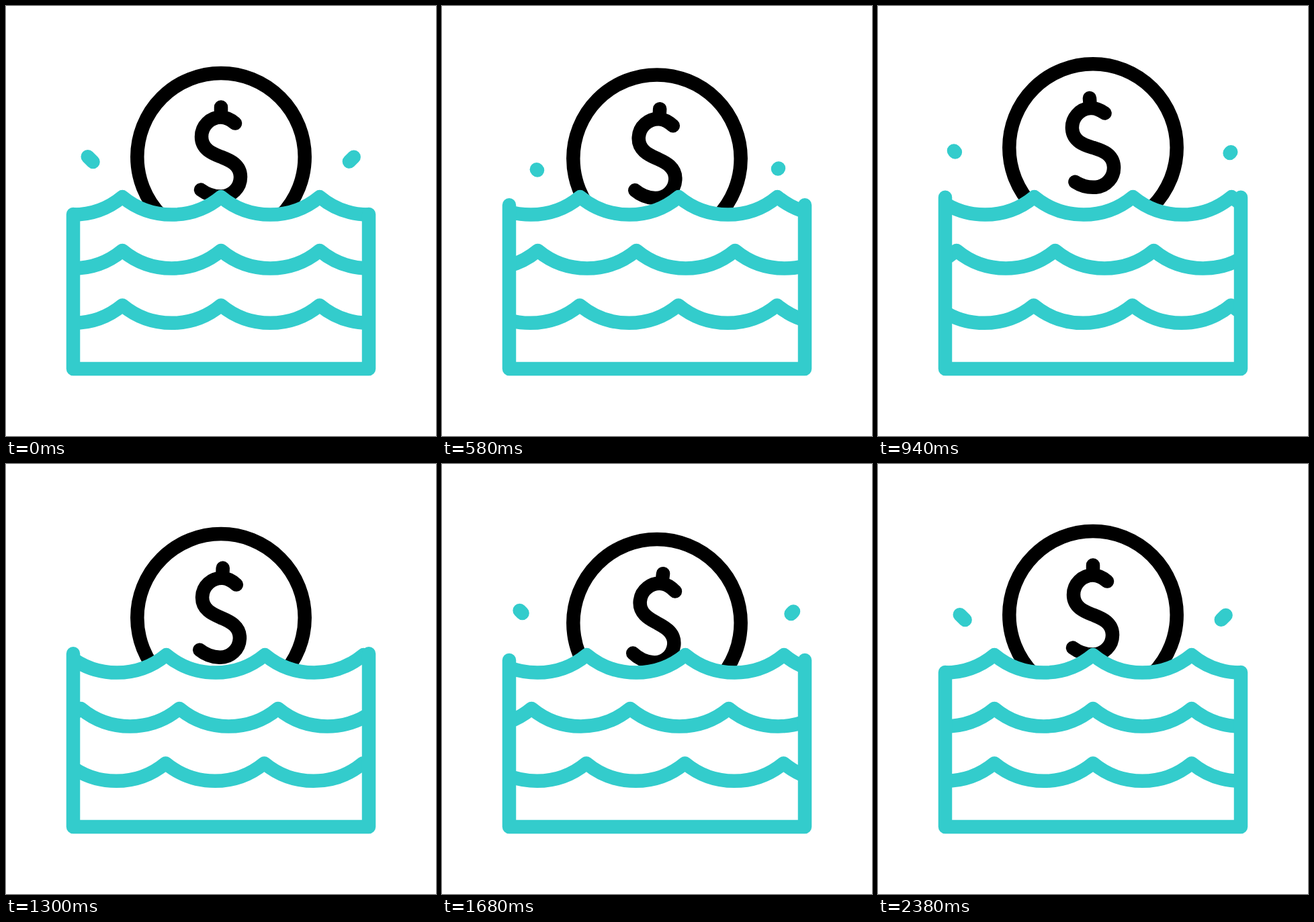
An HTML page for the animation above (2400 ms loop, 640 by 640 pixels).

```html
<!DOCTYPE html>
<html lang="en">
<head>
<meta charset="utf-8">
<title>Floating coin</title>
<style>
  html, body { margin: 0; width: 100%; height: 100%; overflow: hidden; background: #fff; }
  svg { display: block; width: 100%; height: 100%; fill: none; stroke: #33cccc; stroke-width: 20.5; stroke-linecap: round; stroke-linejoin: round; }
</style>
</head>
<body>
<svg viewBox="0 0 640 640">
  <clipPath id="tank"><rect x="100" width="440" height="640"/></clipPath>
  <g id="coin" stroke="#000">
    <circle r="124.7"/>
    <path id="dollar" d="M0-74V-62M21-50C15-55 8-59 0-59C-16-59-29-46-29-30C-29-10-10-4 0 0C10 4 29 10 29 30C29 46 16 59 0 59C-12 59-22 55-30 49"/>
  </g>
  <path id="leftDrop"/>
  <path id="rightDrop"/>
  <g id="waves" clip-path="url(#tank)"></g>
  <path id="box"/>
</svg>
<script>
const $ = id => document.getElementById(id);
const LOOP = 2400, LAST = 2380;

const arcs = 'a115 115 0 0 0 146.8 0'.repeat(7);
const waves = [
  { y: 284.1, drift: 67 },
  { y: 364, drift: -63.5 },
  { y: 445.4, drift: 66 }
].map(({ y, drift }, i) => {
  const path = document.createElementNS('http://www.w3.org/2000/svg', 'path');
  path.setAttribute('d', `M-120.4 ${y}${arcs}` + (i ? '' : 'V700H-120.4Z'));
  if (!i) path.setAttribute('fill', '#fff'); // the water hides the coin
  $('waves').append(path);
  return { path, drift };
});

const clamp = x => Math.min(1, Math.max(0, x));
const smooth = x => { x = clamp(x); return x * x * (3 - 2 * x); };

// Rest, swing to high, swing to low, back to rest.
function bob(t, high, low) {
  const k = t % 1200 / 400;
  if (k < 1) return high * smooth(k);
  if (k < 2) return high + (low - high) * (k - 1);
  return low * (1 - smooth(k - 2));
}

function drawDrops(t) {
  const time = t % 800 + (t % 800 < 400 ? 800 : 0);
  const head = 1 - (1 - clamp((time - 575) / 445)) ** 1.5;
  const tail = smooth((time - 614) / 430);
  const visible = time > 575 && time < 1030;
  const drop = (from, to, place) => {
    const point = k => {
      const x = from + (to - from) * k;
      return `${place(x)} ${x + 102.5}`;
    };
    return visible ? `M${point(tail)}L${point(head)}` : '';
  };
  $('leftDrop').setAttribute('d', drop(142, 111, x => x));
  $('rightDrop').setAttribute('d', drop(140, 113, x => 640 - x));
}

function draw(t) {
  const tide = smooth(1 - Math.abs(t / 1200 - 1));
  for (const { path, drift } of waves) path.setAttribute('transform', `translate(${drift * tide})`);
  const top = 310 - 28.4 * tide;
  $('box').setAttribute('d', `M100 ${top}V540H540V${top}`);
  $('coin').setAttribute('transform', `translate(320 ${224.6 + bob(t, 22, -20)})`);
  $('dollar').setAttribute('transform', `rotate(${bob(t, 11, -5.7)})`);
  drawDrops(t);
}

function tick() {
  const t = performance.now() % LOOP;
  draw(Math.min(t / LAST, 1) * LOOP);
  requestAnimationFrame(tick);
}
tick();
</script>
</body>
</html>
```
